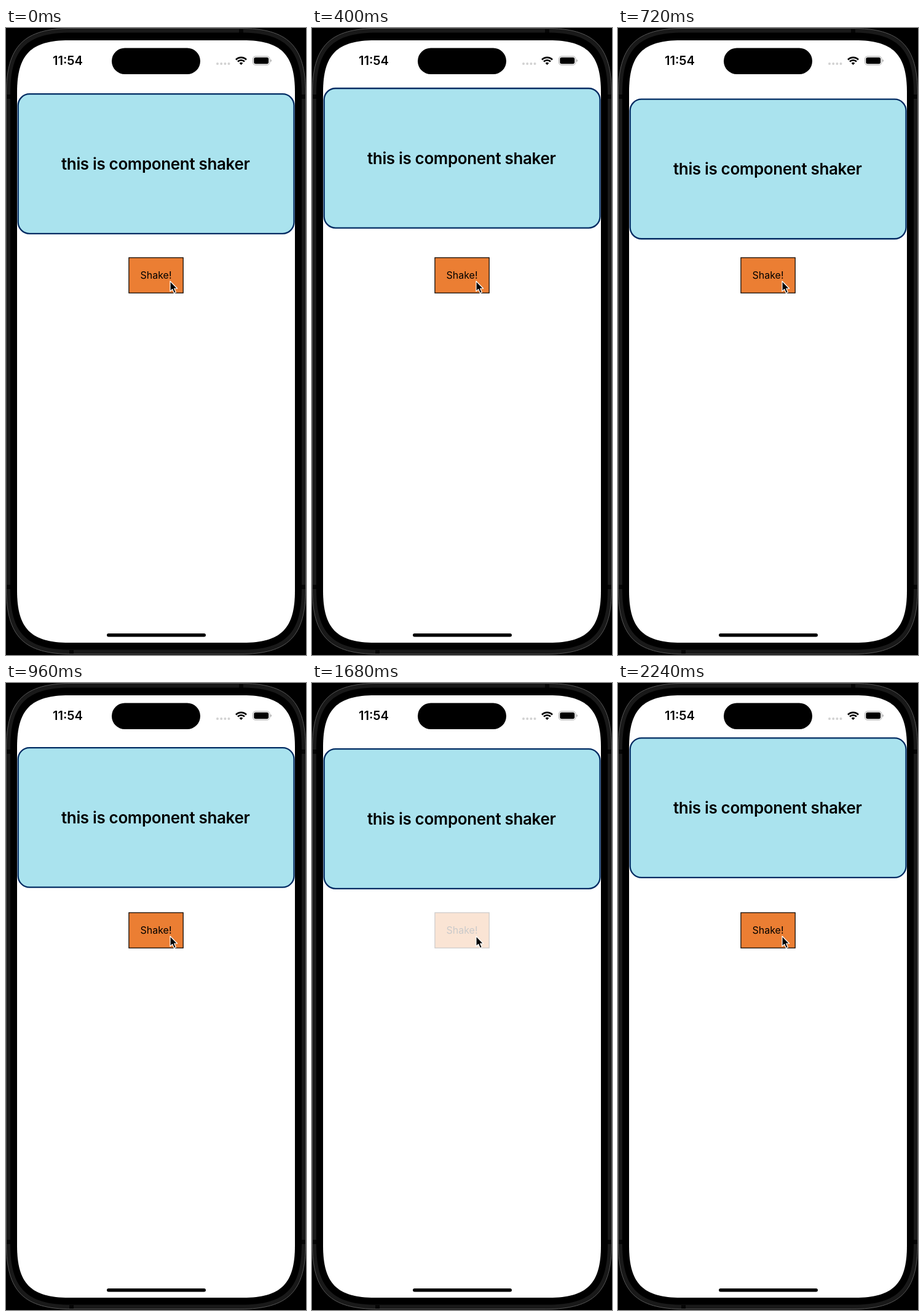
Animation of 488 by 1018 pixels, one loop 2320 ms. Source, as an HTML page:

```html
<!DOCTYPE html>
<html lang="en">
<head>
<meta charset="utf-8">
<title>Component shaker</title>
<style>
  html, body { margin: 0; width: 100%; height: 100%; overflow: hidden; background: #000; }
  svg { display: block; width: 488px; height: 1018px; }
  text { font-family: Inter, "Noto Sans", sans-serif; text-anchor: middle; }
</style>
</head>
<body>
<svg viewBox="0 0 488 1018">
  <path id="body" fill="#191919" stroke="#575757"/>
  <g fill="#050505">
    <path d="M379 2h7v6h-7zM103 1010h7v6h-7zM1.500 108h6v7h-6zM1.500 904h6v7h-6zM480.500 108h6v7h-6zM480.500 904h6v7h-6z"/>
  </g>
  <path id="bezel"/>
  <path id="screen" fill="#fff"/>

  <rect x="172" y="32.500" width="144" height="42.500" rx="21.250"/>
  <rect x="164" y="983" width="161" height="5.500" rx="2.750"/>
  <text x="100.500" y="60" font-size="20" font-weight="600">11:54</text>
  <g fill="#d2d2d2">
    <circle cx="344" cy="58" r="2"/><circle cx="350.200" cy="58" r="2"/>
    <circle cx="356.400" cy="58" r="2"/><circle cx="362.500" cy="58" r="2"/>
  </g>
  <g id="wifi" fill="none" stroke="#000" stroke-width="2.700">
    <path d="M374 51.500a12 12 0 0 1 17 0M377 54.500a7.800 7.800 0 0 1 11 0"/>
    <path d="M382.500 60l-2.900 -2.900a4.100 4.100 0 0 1 5.800 0z" fill="#000" stroke="none"/>
  </g>
  <rect x="401.500" y="46" width="27.500" height="14" rx="4.300" fill="#fff" stroke="#a6a6a6"/>
  <rect x="403.300" y="47.800" width="23.900" height="10.400" rx="2.700"/>
  <path d="M430.300 50.700q1.700 .8 1.700 2.300t-1.700 2.300z" fill="#a6a6a6"/>

  <g id="card">
    <rect x="19.700" y="107.200" width="448.800" height="226.600" rx="18.500"
          fill="#aae3ee" stroke="#002b62" stroke-width="2.300"/>
    <text x="243.200" y="230" font-size="26" font-weight="600" letter-spacing="-.35">this is component shaker</text>
  </g>

  <g id="button">
    <rect x="199.900" y="372.900" width="88.300" height="57.300" fill="#eb7e33" stroke="#000" stroke-width="1.200"/>
    <text x="244" y="407" font-size="16">Shake!</text>
  </g>
  <path d="M267 411v16.500l3.700 -3.400 2.700 6.300 3 -1.200 -2.700 -6.200h5z"
        stroke="#fff" stroke-width="1.200" stroke-linejoin="round"/>
</svg>
<script>
const LOOP = 2320, STEP = 80, AMPLITUDE = 18.4;
const byId = id => document.getElementById(id);

// Rounded rectangle with continuous-curvature corners.
function smoothRect(x, y, w, h, r) {
  const k = 1.3 * r, c = 0.348 * r, X = x + w, Y = y + h;
  return `M${x + k} ${y}H${X - k}C${X - c} ${y} ${X} ${y + c} ${X} ${y + k}` +
    `V${Y - k}C${X} ${Y - c} ${X - c} ${Y} ${X - k} ${Y}` +
    `H${x + k}C${x + c} ${Y} ${x} ${Y - c} ${x} ${Y - k}` +
    `V${y + k}C${x} ${y + c} ${x + c} ${y} ${x + k} ${y}Z`;
}
byId('body').setAttribute('d', smoothRect(0.5, 0.5, 487, 1016, 82));
byId('bezel').setAttribute('d', smoothRect(7, 7.5, 474, 1002, 76));
byId('screen').setAttribute('d', smoothRect(18, 20, 452, 978, 65));

const A = AMPLITUDE;
// Turning points of the shake: [time in ms, vertical offset].
const turns = [
  [-75, A], [75, -A], [215, A], [354, -A], [492, A], [632, -A], [767, A], [897, -A], [1033, A], [1169, 0],
  [1706, 0], [1842, A], [1978, -A], [2114, A], [2250, -A], [2386, A]
];
const ease = u => (1 - Math.cos(Math.PI * Math.min(1, Math.max(0, u)))) / 2;

function offsetAt(t) {
  const i = turns.findIndex(([time]) => time > t);
  const [t0, y0] = turns[i - 1], [t1, y1] = turns[i];
  return y0 + (y1 - y0) * ease((t - t0) / (t1 - t0));
}

function opacityAt(t) {
  const pressed = ease((t - 1280) / 150) - ease((t - 1640) / 250);
  return 1 - 0.85 * pressed;
}

function draw(now) {
  const t = Math.floor((now % LOOP) / STEP) * STEP;
  byId('card').setAttribute('transform', `translate(0 ${offsetAt(t).toFixed(2)})`);
  byId('button').setAttribute('opacity', opacityAt(t).toFixed(3));
}

const start = performance.now();
function tick() {
  draw(performance.now() - start);
  requestAnimationFrame(tick);
}
tick();
</script>
</body>
</html>
```
